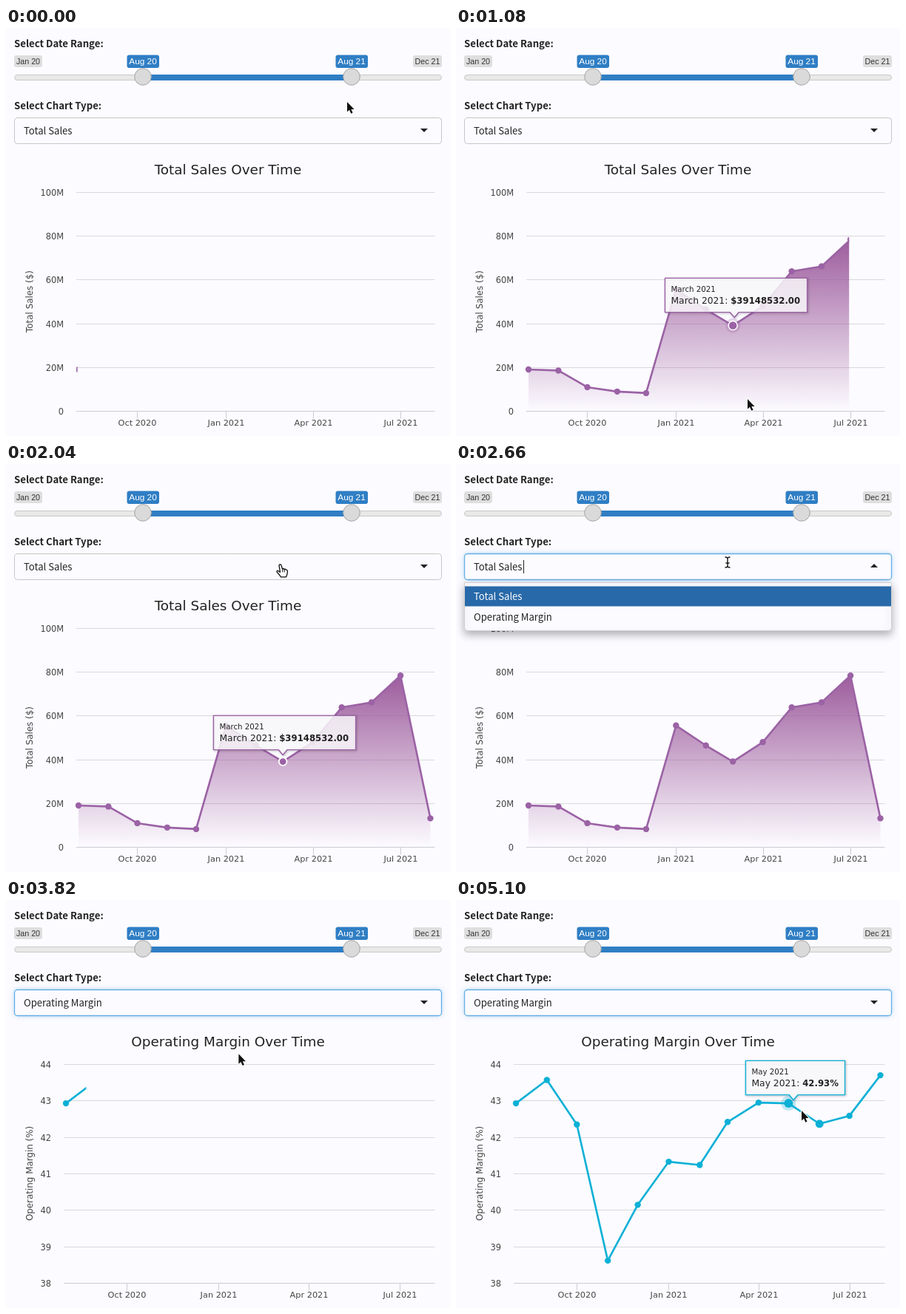
Write an HTML page with a canvas that moves like this. It is 600 px wide and 552 px high and loops after 5120 ms.

```html
<!DOCTYPE html>
<html lang="en">
<head>
<meta charset="utf-8">
<title>Sales dashboard</title>
<style>
html, body { margin: 0; width: 100%; height: 100%; overflow: hidden; background: #fcfbff; }
canvas { display: block; }
</style>
</head>
<body>
<canvas id="stage" width="600" height="552"></canvas>
<script>
const ctx = document.getElementById('stage').getContext('2d');
const LOOP = 5120, REVEAL = 1420;
const OPEN = 2300, CLOSE = 3350, SWAP = 3590;
const BG = '#fcfbff', BLUE = '#2f7ec4';
const UI = '"Noto Sans CJK SC", "Noto Sans CJK JP", "Noto Sans CJK", "Open Sans", sans-serif';
const CHART = '"DejaVu Sans", "Noto Sans", sans-serif';
const ARIAL = '"Liberation Sans", Arial, sans-serif';

// Days since 1 August 2020 for each monthly point
const days = [0, 31, 61, 92, 122, 153, 184, 212, 243, 273, 304, 334, 365];
const ticks = { 2: 'Oct 2020', 5: 'Jan 2021', 8: 'Apr 2021', 11: 'Jul 2021' };

const sales = {
  title: 'Total Sales Over Time', axis: 'Total Sales ($)', color: '#9b62a5',
  halo: 'rgba(155,98,165,.25)', left: 95, x0: 98, span: 475.5,
  min: 0, max: 100, step: 20, start: -50, area: true, labelX: 78,
  label: v => v ? v + 'M' : '0',
  data: [19.1, 18.6, 11, 9, 8.3, 55.6, 46.5, 39.15, 48, 63.9, 66.2, 78.4, 13.2],
  // time, point, month, value
  tips: [[560, 8, 'April 2021', '$47971206.00'], [750, 7, 'March 2021', '$39148532.00']],
  tipEnd: OPEN, leave: 1800
};
const margin = {
  title: 'Operating Margin Over Time', axis: 'Operating Margin (%)', color: '#0cb0d6',
  halo: 'rgba(12,176,214,.25)', left: 78, x0: 81, span: 492.5,
  min: 38, max: 44, step: 1, start: 3596, area: false, labelX: 61,
  label: v => '' + v,
  data: [42.93, 43.57, 42.35, 38.62, 40.15, 41.33, 41.24, 42.42, 42.95, 42.93, 42.37, 42.59, 43.7],
  tips: [[4130, 9, 'May 2021', '42.93%'], [4260, 10, 'June 2021', '42.37%'], [4900, 9, 'May 2021', '42.93%']],
  tipEnd: Infinity, leave: Infinity
};

// Pointer path: time, x, y
const path = [
  [0, 461, 100], [150, 458, 108], [750, 395, 440], [1080, 394, 502], [1250, 393, 500],
  [1900, 373, 160], [2040, 372, 143], [2250, 367, 133], [2700, 367, 133], [3150, 316, 207],
  [3820, 314, 208], [4260, 472, 315], [4700, 484, 338], [4900, 470, 303], [5100, 467, 285], [5120, 467, 285]
];

const clamp = v => Math.max(0, Math.min(1, v));
const lerp = (a, b, k) => a + (b - a) * k;
const sine = p => (1 - Math.cos(Math.PI * clamp(p))) / 2;

function text(str, x, y, font, color = '#333', align = 'left') {
  ctx.font = font;
  ctx.fillStyle = color;
  ctx.textAlign = align;
  ctx.fillText(str, x, y);
}

function paint(fill, stroke, lw = 1) {
  if (fill) { ctx.fillStyle = fill; ctx.fill(); }
  if (stroke) { ctx.strokeStyle = stroke; ctx.lineWidth = lw; ctx.stroke(); }
}

function box(x, y, w, h, r, fill, stroke, lw) {
  ctx.beginPath();
  ctx.roundRect(x, y, w, h, r);
  paint(fill, stroke, lw);
}

function dot(x, y, r, fill, stroke, lw) {
  ctx.beginPath();
  ctx.arc(x, y, r, 0, 7);
  paint(fill, stroke, lw);
}

function line(points, color, lw) {
  ctx.beginPath();
  points.forEach(([x, y]) => ctx.lineTo(x, y));
  ctx.lineJoin = ctx.lineCap = 'round';
  paint(null, color, lw);
}

function shadow(color, blur, x = 0, y = 0) {
  ctx.shadowColor = color;
  ctx.shadowBlur = blur;
  ctx.shadowOffsetX = x;
  ctx.shadowOffsetY = y;
}

function slider() {
  text('Select Date Range:', 11, 26, 'bold 13.2px ' + UI, '#222');
  box(11.5, 63.5, 577, 7, 3.5, '#e9e9e7', '#c9c9c9');
  ctx.fillStyle = BLUE;
  ctx.fillRect(185, 63, 282, 8);
  for (const [x, w, str] of [[11, 38, 'Jan 20'], [550, 39, 'Dec 21']]) {
    box(x, 37, w, 16, 3, '#dedede');
    text(str, x + w / 2, 48.5, '10.7px ' + ARIAL, '#333', 'center');
  }
  for (const [x, str] of [[185, 'Aug 20'], [467, 'Aug 21']]) {
    dot(x, 66, 11.3, '#dadada', '#a5a5a5', 1);
    box(x - 21.5, 36.5, 43.5, 17.5, 3, BLUE);
    text(str, x, 49, '11.8px ' + ARIAL, '#fff', 'center');
  }
}

function select(t) {
  const open = t >= OPEN && t < CLOSE, focus = t >= OPEN;
  text('Select Chart Type:', 11, 110, 'bold 13.2px ' + UI, '#222');
  if (focus) shadow('rgba(102,175,233,.5)', 7);
  box(11.5, 121.5, 577, 35, 4, BG);
  shadow('transparent', 0);
  box(11.5, 121.5, 577, 35, 4, BG, focus ? '#66afe4' : '#c6c6c8', focus ? 1.3 : 1);
  text(t < CLOSE ? 'Total Sales' : 'Operating Margin', 24, 144, '13.1px ' + UI, '#222');
  const [base, tip] = open ? [140, 135] : [136, 141];
  ctx.beginPath();
  ctx.moveTo(560, base);
  ctx.lineTo(570, base);
  ctx.lineTo(565, tip);
  paint('#222');
  if (!open) return;
  if ((t - OPEN) % 1000 < 500) {
    ctx.fillStyle = '#222';
    ctx.fillRect(91, 130, 1, 18);
  }
  shadow('rgba(0,0,0,.3)', 12, 0, 5);
  box(11.5, 160.5, 577, 65, [0, 0, 4, 4], BG, '#d0d0d4');
  shadow('transparent', 0);
  const active = t < 3060 ? 0 : 1;
  ctx.fillStyle = '#2869a9';
  ctx.fillRect(12, active ? 193 : 165.5, 576, 27);
  ['Total Sales', 'Operating Margin'].forEach((str, i) =>
    text(str, 24, 184 + i * 27.5, '13.1px ' + UI, i === active ? '#fff' : '#222'));
}

function tooltip(c, pts, t) {
  if (t < c.tips[0][0] || t >= c.tipEnd) return;
  let x, y, tip;
  c.tips.forEach((next, n) => {
    if (t < next[0]) return;
    const [px, py] = pts[next[1]];
    const until = c.tips[n + 1]?.[0] ?? LOOP;
    const k = tip ? 1 - Math.exp((next[0] - Math.min(t, until)) / 110) : 1;
    x = lerp(x ?? px, px, k);
    y = lerp(y ?? py, py, k);
    tip = next;
  });
  const [, , month, value] = tip, small = '10.2px ' + CHART;
  const main = '12.3px ' + CHART, bold = 'bold 11.7px ' + CHART;
  ctx.font = main;
  const lead = ctx.measureText(month + ': ').width;
  ctx.font = bold;
  const w = Math.round(lead + ctx.measureText(value).width + 17);
  const l = Math.round(x + 1.5 - w / 2) + .5, b = Math.round(y - 17) + .5, top = b - 46;
  const shape = () => {
    ctx.beginPath();
    [[l, top], [l + w, top], [l + w, b], [x + 6, b], [x, b + 7], [x - 6, b], [l, b]]
      .forEach(p => ctx.lineTo(...p));
    ctx.closePath();
  };
  ctx.globalAlpha = clamp((c.tipEnd - t) / 150);
  shape();
  shadow('rgba(0,0,0,.35)', 3, 1, 1);
  paint(null, c.color, 1.4);
  shadow('transparent', 0);
  shape();
  paint('rgba(248,247,250,.85)', c.color, 1.2);
  text(month, l + 8, top + 18.5, small, '#222');
  text(month + ': ', l + 8, top + 34.5, main, '#222');
  text(value, l + 8 + lead, top + 34.5, bold, '#222');
  ctx.globalAlpha = 1;
}

function hoverDots(c, pts, t) {
  if (t >= c.tipEnd) return;
  c.tips.forEach(([at, i], n) => {
    const end = Math.min(c.tips[n + 1]?.[0] ?? Infinity, c.leave);
    if (t < at || t > end + 250) return;
    const [x, y] = pts[i];
    if (t < end) dot(x, y, 10, c.halo);
    dot(x, y, t < end ? 6 : 5.5, c.color, c.area ? '#fff' : null, 1.5);
  });
  if (t > c.leave) dot(...pts[7], 5, c.color, '#fff', 1.2);
}

function chart(c, t) {
  const toY = v => 518.5 - (v - c.min) / (c.max - c.min) * 296.2;
  const pts = c.data.map((v, i) => [c.x0 + days[i] / 365 * c.span, toY(v)]);
  text(c.title, 300, 198, '18.4px ' + CHART, '#222', 'center');
  for (let v = c.min; v <= c.max; v += c.step) {
    const y = Math.floor(toY(v)) + .5;
    line([[c.left, y], [579, y]], v === c.min ? '#c9cdd6' : '#d9d8dc', 1);
    text(c.label(v), c.labelX, y + 4.5, '11.4px ' + CHART, '#444', 'right');
  }
  for (const i in ticks) {
    const x = Math.round(pts[i][0]) + .5;
    line([[x, 519], [x, 528]], '#c9cdd6', 1);
    text(ticks[i], x, 538, '11.3px ' + CHART, '#444', 'center');
  }
  ctx.save();
  ctx.translate(36, 370);
  ctx.rotate(-Math.PI / 2);
  text(c.axis, 0, 0, '11.9px ' + CHART, '#444', 'center');
  ctx.restore();

  ctx.save();
  const p = (t - c.start) / REVEAL, pad = p > .1 ? 4 : 0;
  ctx.beginPath();
  ctx.rect(c.left - pad, 200, (579 - c.left) * sine(p) + pad, 330);
  ctx.clip();
  if (c.area) {
    const g = ctx.createLinearGradient(0, 286, 0, 518);
    g.addColorStop(0, 'rgba(152,84,152,.95)');
    g.addColorStop(1, 'rgba(152,84,152,0)');
    ctx.beginPath();
    [[pts[0][0], 518], ...pts, [pts[12][0], 518]].forEach(q => ctx.lineTo(...q));
    paint(g);
  }
  line(pts, c.color, 2.6);
  pts.forEach(q => dot(...q, 4.2, c.color));
  hoverDots(c, pts, t);
  ctx.restore();
  tooltip(c, pts, t);
}

const arrow = new Path2D('M0 0V13.5L3 10.7L5.300 15.800L7.600 14.700L5.400 9.900H9.600Z');
const hand = new Path2D('M-3-6Q-1.5-8 0-6L1.5-1Q3-2 4-.5Q5.5-1.5 6.5 .5Q8 0 8.5 2L8 6L6.5 10H-.5Q-3 6-6 3Q-6 .5-3.5 2L-1.5 3.5Z');
const beam = new Path2D('M-3-7Q0-7 0-5Q0-7 3-7M0-5V5M-3 7Q0 7 0 5Q0 7 3 7M-2 1H2');

function pointer(t) {
  const n = path.findIndex(k => k[0] > t), [ta, xa, ya] = path[n - 1], [tb, xb, yb] = path[n];
  const k = (t - ta) / (tb - ta), x = lerp(xa, xb, k), y = lerp(ya, yb, k);
  const open = t > OPEN && t < CLOSE, overSelect = y > 121 && y < 157;
  ctx.save();
  ctx.translate(x, y);
  ctx.lineJoin = 'round';
  if (overSelect && open) {
    for (const [color, lw] of [['#fff', 3], ['#111', 1.4]]) {
      ctx.strokeStyle = color;
      ctx.lineWidth = lw;
      ctx.stroke(beam);
    }
  } else if (overSelect || open) {
    ctx.fillStyle = '#fff';
    ctx.fill(hand);
    ctx.strokeStyle = '#111';
    ctx.lineWidth = 1.3;
    ctx.stroke(hand);
    line([[1.5, -1], [2, 3]], '#111', 1);
    line([[4, -.5], [4.5, 3]], '#111', 1);
  } else {
    ctx.strokeStyle = '#fff';
    ctx.lineWidth = 2.2;
    ctx.stroke(arrow);
    ctx.fillStyle = '#111';
    ctx.fill(arrow);
  }
  ctx.restore();
}

function draw(t) {
  ctx.fillStyle = BG;
  ctx.fillRect(0, 0, 600, 552);
  chart(t < SWAP ? sales : margin, t);
  slider();
  select(t);
  pointer(t);
}

const origin = performance.now();
function frame() {
  draw(Math.max(0, performance.now() - origin) % LOOP);
  requestAnimationFrame(frame);
}
frame();
</script>
</body>
</html>
```
